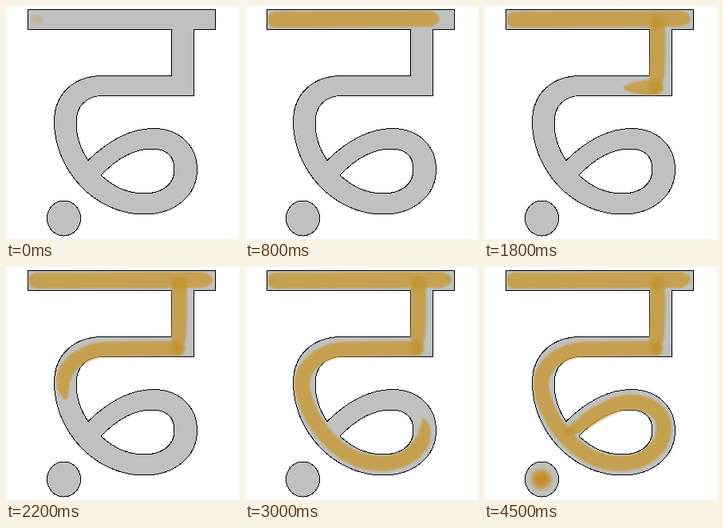
These frames come from a looping animation (292 by 292 pixels, 4600 ms). An HTML page:

```html
<!DOCTYPE html>
<html lang="en">
<head>
<meta charset="utf-8">
<title>Letter stroke order</title>
<style>
  html, body { margin: 0; width: 100%; height: 100%; overflow: hidden; background: #fff; }
  svg { display: block; width: 292px; height: 292px; }
  .letter { fill: #c0c0c0; stroke: #000; fill-rule: evenodd; shape-rendering: crispEdges; }
  .brush { fill: none; stroke: #c59b3e; stroke-linecap: round; stroke-linejoin: round; filter: url(#soft); }
  .overlap { fill: #bd8f26; filter: url(#softer); }
</style>
</head>
<body>
<svg viewBox="0 0 292 292">
  <defs>
    <filter id="soft" filterUnits="userSpaceOnUse" x="0" y="0" width="292" height="292" color-interpolation-filters="sRGB">
      <feGaussianBlur stdDeviation="1.2"/>
    </filter>
    <filter id="softer" filterUnits="userSpaceOnUse" x="0" y="0" width="292" height="292" color-interpolation-filters="sRGB">
      <feGaussianBlur stdDeviation="2.4"/>
    </filter>
  </defs>
  <g class="letter">
    <path d="M27.5 4.5H262.5V29.5H235.5V112.5H121C101 112.5 88 125 88 146C88 165 95 182 103 193.5
      C130 167 156 153.5 185 153.5C217 153.5 239.5 175 239.5 205C239.5 239 210 261 173 261
      C111 261 60.5 205 60.5 145C60.5 110 85 87.5 121 87.5H207.5V29.5H27.5Z
      M119 212C140 190 160 179 183 179C202 179 211 189 211 205C211 224 195 235 173 235C153 235 134 226 119 212Z"/>
    <ellipse cx="72.5" cy="266" rx="21" ry="22"/>
  </g>
  <g id="ink"></g>
</svg>
<script>
const SVG = 'http://www.w3.org/2000/svg';
const ink = document.getElementById('ink');

function add(parent, name, attrs) {
  const el = document.createElementNS(SVG, name);
  for (const key in attrs) el.setAttribute(key, attrs[key]);
  return parent.appendChild(el);
}

// The pointed tip is built from strokes: [share of the width, share of the taper behind the tip].
const TIP = [[1, 1], [.8, .5], [.6, .25], [.35, 0]];

// keys: [step, share of the path painted]
function brush(d, width, taper, keys) {
  const group = add(ink, 'g', { class: 'brush', opacity: .86 });
  const layers = TIP.map(([size, lag]) =>
    ({ lag: lag * taper, el: add(group, 'path', { d, 'stroke-width': width * size }) }));
  return { group, layers, keys, length: layers[0].el.getTotalLength() };
}

const brushes = [
  brush('M38 17L255 16', 20, 9, [[0, .018], [8, .93], [10, 1]]),
  brush('M217 20Q219 62 215 106', 19, 18, [[10, 0], [11, .1], [14, .37], [18, 1]]),
  brush(`M215 102L125 103C96 105 72 122 71.5 147C73 180 110 247 172 246.5
    C208 245 227 222 225.5 200C224 180 205 169 183 169C158 170 133 189 107 208`,
    19, 24, [[17, 0], [22, .335], [30, .745], [36, 1]])
];

const overlaps = [[217, 22, 11], [214, 102, 18], [107, 205, 35]].map(([cx, cy, from]) =>
  ({ from, el: add(ink, 'circle', { class: 'overlap', cx, cy, r: 8, opacity: .5 }) }));
const halo = add(ink, 'circle', { class: 'overlap', cx: 72, cy: 266, style: 'fill:#c59b3e' });
const core = add(ink, 'circle', { class: 'overlap', cx: 72, cy: 266, style: 'fill:#c48c28' });

function interpolate(keys, x) {
  if (x < keys[0][0]) return -1;
  for (let i = 1; i < keys.length; i++) {
    const [x0, y0] = keys[i - 1], [x1, y1] = keys[i];
    if (x <= x1) return y0 + (y1 - y0) * (x - x0) / (x1 - x0);
  }
  return 1;
}

function draw(now) {
  const time = now % 4600;
  const step = time < 4000 ? Math.min(36, Math.floor(time / 100)) : Math.floor(time / 100);

  for (const { layers, keys, length } of brushes) {
    const tip = interpolate(keys, step) * length;
    for (const { lag, el } of layers) {
      const painted = tip - lag;
      el.style.display = painted < 0 ? 'none' : '';
      el.setAttribute('stroke-dasharray', `${Math.max(.01, painted)} 999`);
    }
  }
  brushes[0].group.setAttribute('opacity', Math.min(.86, .3 + step * .28));
  for (const { from, el } of overlaps) el.style.display = step >= from ? '' : 'none';

  const dot = Math.max(0, Math.min(1, (step - 39) / 6));
  halo.setAttribute('r', 13 * dot);
  halo.setAttribute('opacity', .8 * Math.min(1, dot * 3));
  core.setAttribute('r', 9 * dot);
  requestAnimationFrame(draw);
}
draw(0);
</script>
</body>
</html>
```
